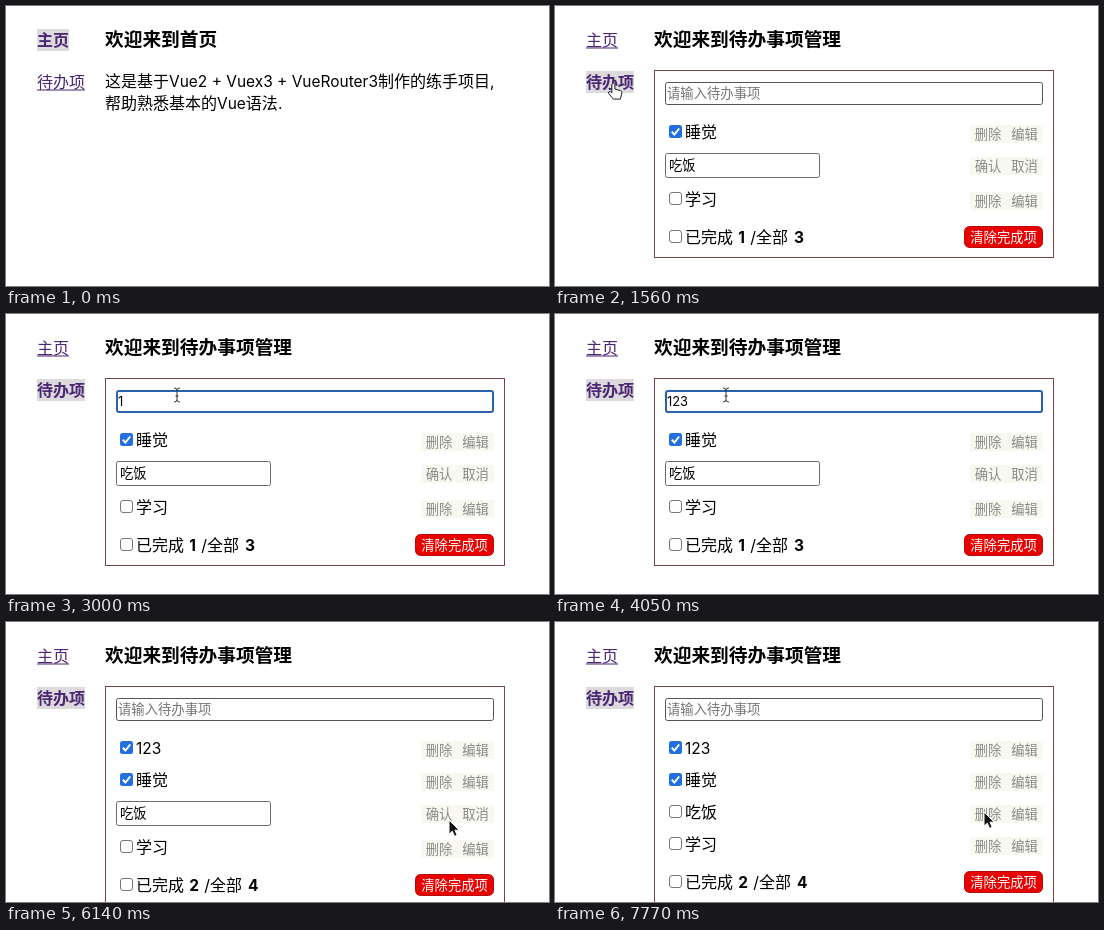
These frames come from a looping animation (543x280 px, 8 s). An HTML page:

```html
<!DOCTYPE html>
<html lang="zh-CN">
<head>
<meta charset="utf-8">
<style>
html, body { margin: 0; width: 100%; height: 100%; overflow: hidden; background: #fff; }
svg { display: block; font: 16px Inter, "Noto Sans CJK SC", "Noto Sans CJK", sans-serif; }
.latin { font-size: .968em; }
.bold { font-weight: 700; }
.title { font-size: 18.72px; font-weight: 700; }
.small { font-size: 13.333px; }
.hint { fill: #757575; }
.tool { fill: #898989; }
.link { fill: #4b2672; }
.clear { fill: #fff; font-weight: 500; }
</style>
</head>
<body>
<svg width="543" height="280" viewBox="0 0 543 280">
  <g id="page"></g>
  <g id="cursor"></g>
</svg>
<script>
const LOOP = 8000;
const OPEN = 1420, FOCUS = 2420, ADD = 4420, CHECK = 5420, CONFIRM = 6900;
const KEYS = [2900, 3300, 3600];

// time, x, y of the pointer's hot spot
const PATH = [
  [0, 270, 300], [450, 270, 300], [1040, 116, 82], [1280, 56, 77], [1520, 56, 77],
  [2000, 171, 81], [4700, 171, 81], [5100, 126, 117], [5300, 123, 122], [5600, 123, 122],
  [6080, 443, 198], [7200, 443, 198], [7540, 429, 190], [LOOP, 429, 190]
];

const SHAPES = {
  arrow: '<path d="M0 0V14.2L3.3 11.2L5.6 16.4L8.2 15.2L5.9 10.2H10.2Z" fill="#111" stroke="#fff"/>',
  beam: '<path d="M-3-7Q0-7 0-5Q0-7 3-7M0-5V5M-3 7Q0 7 0 5Q0 7 3 7M-1.5 1H1.5" fill="none" stroke="#333"/>',
  hand: '<path d="M-1.5 1Q0-1 1.5 1V6L7 7.5Q9 8 8.5 10L7 16H0L-5 10Q-5 8-3 8.5L-1.5 10Z" fill="#fff" stroke="#222"/>'
};

const page = document.getElementById('page');
const cursor = document.getElementById('cursor');

const text = (x, y, s, cls = '') =>
  `<text x="${x}" y="${y}" class="${cls}">` +
  s.replace(/[\x20-\x7e]+/g, '<tspan class="latin">$&</tspan>') + '</text>';

const rect = (x, y, w, h, fill, extra = '') =>
  `<rect x="${x}" y="${y}" width="${w}" height="${h}" fill="${fill}" ${extra}/>`;

const frame = (x, y, w, h, color, r = 0) =>
  rect(x + .5, y + .5, w - 1, h - 1, '#fff', `stroke="${color}" rx="${r}"`);

function link(y, s, active) {
  const w = s.length * 16;
  return (active ? rect(31, y - 17, w, 22, '#dcdadd') : rect(31, y + 1.5, w, 1, '#4b2672')) +
    text(31, y, s, active ? 'link bold' : 'link');
}

function checkbox(mid, on) {
  const y = mid - 7;
  return on
    ? rect(114, y, 13, 13, '#2270e0', 'rx="2.5"') +
      `<path d="M116.8 ${y + 6.8}l2.6 2.7l4.8-6" fill="none" stroke="#fff" stroke-width="2"/>`
    : frame(114, y, 13, 13, '#767676', 2.5);
}

function tools(mid, a, b) {
  return rect(415, mid - 8, 73, 18, '#f8f8f0') +
    text(419.7, mid + 6, a, 'small tool') + text(456.3, mid + 6, b, 'small tool');
}

function home() {
  return text(99, 40, '欢迎来到首页', 'title') +
    text(99, 81, '这是基于Vue2 + Vuex3 + VueRouter3制作的练手项目,') +
    text(99, 103, '帮助熟悉基本的Vue语法.');
}

function todo(t) {
  const editing = t < CONFIRM;
  const focused = t >= FOCUS && t < CHECK;
  const typed = t < ADD ? '123'.slice(0, KEYS.filter(k => t >= k).length) : '';
  const items = [['睡觉', true], ['吃饭', false], ['学习', false]];
  if (t >= ADD) items.unshift(['123', t >= CHECK]);

  let top = 110, rows = '';
  for (const [name, done] of items) {
    const edit = editing && name === '吃饭';
    const mid = top + 16;
    rows += edit
      ? frame(110, top + 5, 155, 25, '#6a6a6a', 2) + text(114, top + 22, name, 'small') +
        tools(top + 17, '确认', '取消')
      : checkbox(mid, done) + text(130, mid + 6, name) + tools(mid + 1, '删除', '编辑');
    top += edit ? 35 : 32;
  }

  const mid = top + 22;
  const done = items.filter(i => i[1]).length;
  const count = `<text x="130" y="${mid + 6}">已完成 <tspan class="bold latin" dx=".7">${done}</tspan>` +
    ` <tspan dx=".8">/</tspan>全部 <tspan class="bold latin" dx="1.5">${items.length}</tspan></text>`;

  return text(99, 40, '欢迎来到待办事项管理', 'title') +
    frame(99, 64, 400, top - 21, '#7a4347') +
    (focused
      ? rect(111, 77, 376, 21, '#fff', 'stroke="#2862ad" stroke-width="2" rx="2"')
      : frame(110, 76, 378, 23, '#555', 2)) +
    text(112, 92, typed || '请输入待办事项', typed ? 'small' : 'small hint') +
    rows + checkbox(mid, false) + count +
    rect(409.5, mid - 10.5, 78, 21, '#e90000', 'stroke="#b90a0a" rx="5"') +
    text(415.3, mid + 5, '清除完成项', 'small clear');
}

function pointer(t) {
  const i = PATH.findIndex(p => p[0] > t);
  const [t0, x0, y0] = PATH[i - 1], [t1, x1, y1] = PATH[i];
  const u = (t - t0) / (t1 - t0), e = u * u * (3 - 2 * u);
  return [x0 + (x1 - x0) * e, y0 + (y1 - y0) * e];
}

function shapeAt(x, y, open) {
  if (x > 30 && x < 80 && y > 65 && y < 87) return 'hand';
  const overText = open ? x > 110 && x < 488 && y > 76 && y < 99
                        : x > 99 && x < 492 && y > 66 && y < 108;
  return overText ? 'beam' : 'arrow';
}

let shown = '';
function draw(now) {
  const t = now % LOOP, open = t >= OPEN;
  const html = link(40, '主页', !open) + link(82, '待办项', open) + (open ? todo(t) : home());
  if (html !== shown) page.innerHTML = shown = html;

  const [x, y] = pointer(t);
  cursor.innerHTML = SHAPES[shapeAt(x, y, open)];
  cursor.setAttribute('transform', `translate(${x.toFixed(1)} ${y.toFixed(1)})`);
  requestAnimationFrame(draw);
}
draw(0);
</script>
</body>
</html>
```
